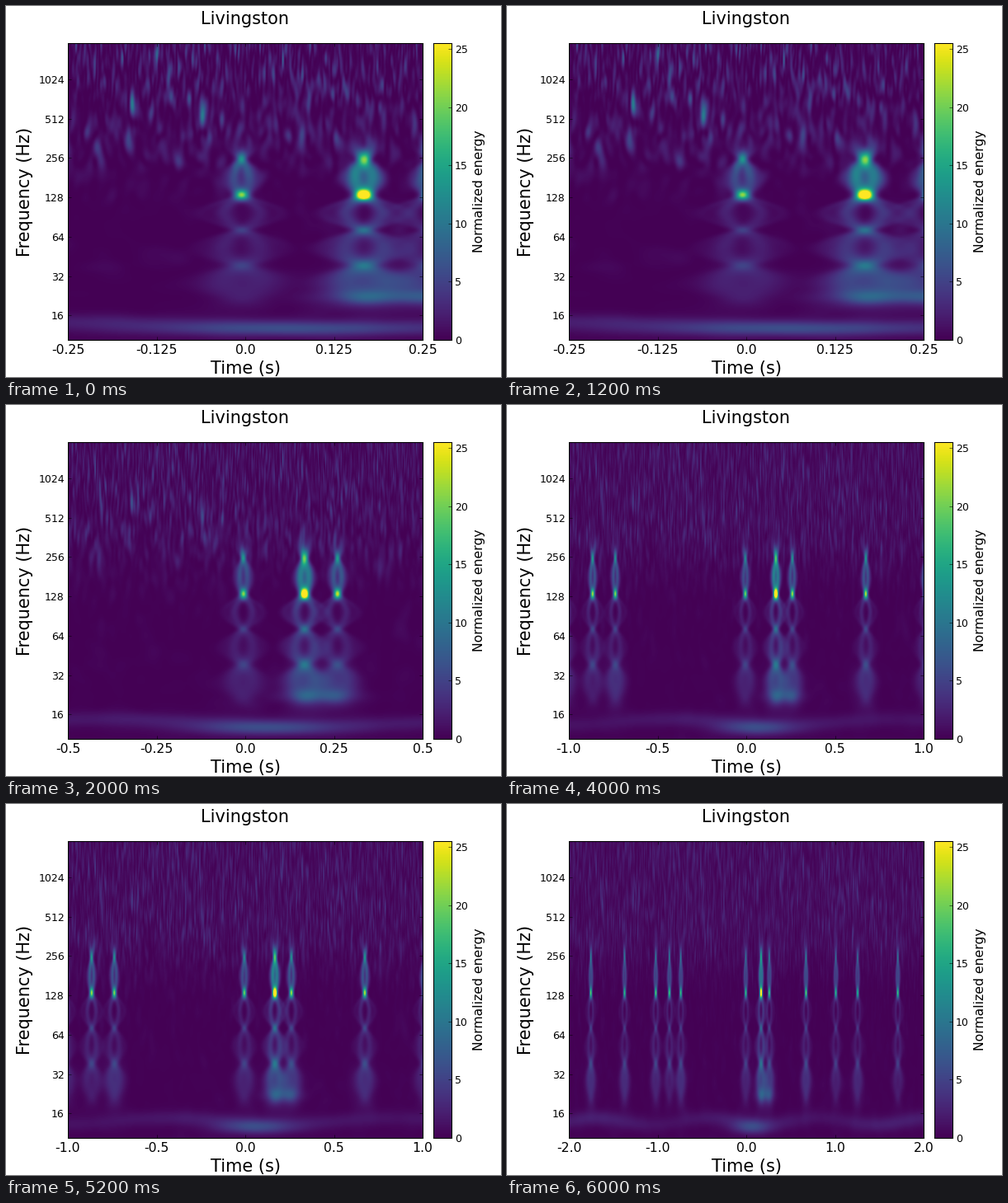
A matplotlib script for the animation above (8000 ms loop, 600 px wide and 450 px high).

```python
import numpy as np
import matplotlib.pyplot as plt
from matplotlib.animation import FuncAnimation

plt.rcParams["font.family"] = "DejaVu Sans"

W, H, DPI = 600, 450, 75
LEFT, RIGHT, TOP, BOTTOM = 75, 505, 45, 405
OCTAVE = 47.8          # pixels per doubling of frequency
COLS, ROWS = 430, 360
VMAX = 25.5
SPANS = [0.25, 0.5, 1.0, 2.0]

# Arrival times in seconds; the loudest one is a close pair.
GLITCHES = [-1.752, -1.372, -1.02, -0.866, -0.738, -0.005,
            0.163, 0.171, 0.26, 0.674, 1.01, 1.256, 1.709]

y = TOP + 0.5 + np.arange(ROWS)[:, None]


def bump(x, sigma):
    return np.exp(-(x / sigma) ** 2 / 2)


def step(x, softness):
    return 1 / (1 + np.exp(-x / softness))


# Each glitch is a braid of two strands, wider and softer towards low frequency.
braid = (0.010 + 0.016 * step(y - 232, 7)) * np.sin(np.pi * (y - 186) / 43)
thickness = 0.005 * 2 ** ((y - 182) / 80)
strength = (2 + 4 * bump(y - 205, 18)) * step(y - 162, 7) * step(345 - y, 10)


def blur(z, sigma, axis):
    shape = (-1, 1) if axis == 0 else (1, -1)
    freq = np.fft.fftfreq(z.shape[axis]).reshape(shape)
    return np.fft.ifft(np.fft.fft(z, axis=axis) * bump(freq, 1 / (2 * np.pi * sigma)), axis=axis)


def noise(span, looks, rng):
    """Streaks, narrower and stronger towards high frequency, averaged when zoomed out."""
    width = np.clip(1.4 * 2 ** (0.7 * (y - 65) / OCTAVE) * SPANS[0] / span, 0.7, 30)
    total = 0
    for _ in range(looks):
        z = rng.normal(size=(ROWS, COLS)) + 1j * rng.normal(size=(ROWS, COLS))
        power = np.abs(blur(blur(z, 9, 0), width, 1)) ** 2
        total = total + power / power.mean(axis=1, keepdims=True)
    return total / looks * (0.12 + 0.95 * step(190 - y, 15))


def spectrogram(span, looks):
    rng = np.random.default_rng(7)
    t = ((np.arange(COLS) + 0.5) / COLS * 2 - 1) * span
    pixel = 0.6 * 2 * span / COLS

    def pulse(x, sigma):
        wide = np.hypot(sigma, pixel)
        return sigma / wide * bump(x, wide)

    energy = 0
    for t0 in GLITCHES:
        d = t - t0
        glitch = 13 * pulse(d, 0.007) * bump(y - 229.5, 4.5)
        glitch = glitch + 3.5 * pulse(d, 0.0045) * bump(y - 182, 6)
        for scale, weight in ((-1, 1), (1, 1), (-2.2, 0.3), (2.2, 0.3)):
            glitch += weight * strength * pulse(d + scale * braid, thickness)
        glitch += rng.uniform(0.5, 2.6) * pulse(d, 0.035) * bump(y - 340, 17)
        energy = energy + rng.uniform(0.9, 1.1) * glitch

    # Slow rumble along the bottom
    energy += 4.2 * bump(t - 0.05, 0.14) * bump(y - 392, 6)
    energy += 4.5 * bump(t - 0.21, 0.065) * bump(y - 353, 6)
    energy += (1.5 + 0.5 * np.cos(3.7 * t)) * bump(y - 385 - 4 * np.sin(5 * t + 0.6), 6.5)
    return energy + noise(span, looks, rng)


def add_axes(left, right):
    ax = fig.add_axes([left / W, 1 - BOTTOM / H, (right - left) / W, (BOTTOM - TOP) / H])
    ax.tick_params(direction="in", length=4, width=0.5, pad=4, labelsize=12)
    return ax


def label(x, y, text, size, rotation=0):
    fig.text(x / W, 1 - y / H, text, size=size, rotation=rotation,
             ha="center", va="baseline", rotation_mode="anchor")


fig = plt.figure(figsize=(W / DPI, H / DPI), dpi=DPI, facecolor="white")
plt.rcParams["axes.linewidth"] = 1

ax = add_axes(LEFT, RIGHT)
image = ax.imshow(np.zeros((ROWS, COLS)), cmap="viridis", vmin=0, vmax=VMAX,
                  extent=(-1, 1, BOTTOM, TOP), aspect="auto", interpolation="nearest")
ax.tick_params(top=True, right=True)
ax.tick_params(axis="x", labelsize=15, pad=4.8)
ax.set_yticks([88.7 + OCTAVE * i for i in range(7)], [str(1024 >> i) for i in range(7)])

bar = add_axes(518, 540)
bar.imshow(np.linspace(VMAX, 0, 256)[:, None], cmap="viridis", vmin=0, vmax=VMAX,
           extent=(0, 1, 0, VMAX), aspect="auto")
bar.set_xticks([])
bar.yaxis.tick_right()
bar.set_yticks(range(0, 26, 5))

label(290, 22, "Livingston", 20)
label(290, 446, "Time (s)", 20)
label(29, 225, "Frequency (Hz)", 20, 90)
label(578, 225, "Normalized energy", 15, 90)

spectra = [spectrogram(span, i + 1) for i, span in enumerate(SPANS)]


def update(i):
    image.set_data(spectra[i])
    ticks = [k / 2 for k in range(-2, 3)]
    ax.set_xticks(ticks, [str(k * SPANS[i]) for k in ticks])
    return (image,)


anim = FuncAnimation(fig, update, frames=len(SPANS), interval=2000, repeat=True, repeat_delay=0)
plt.show()
```
